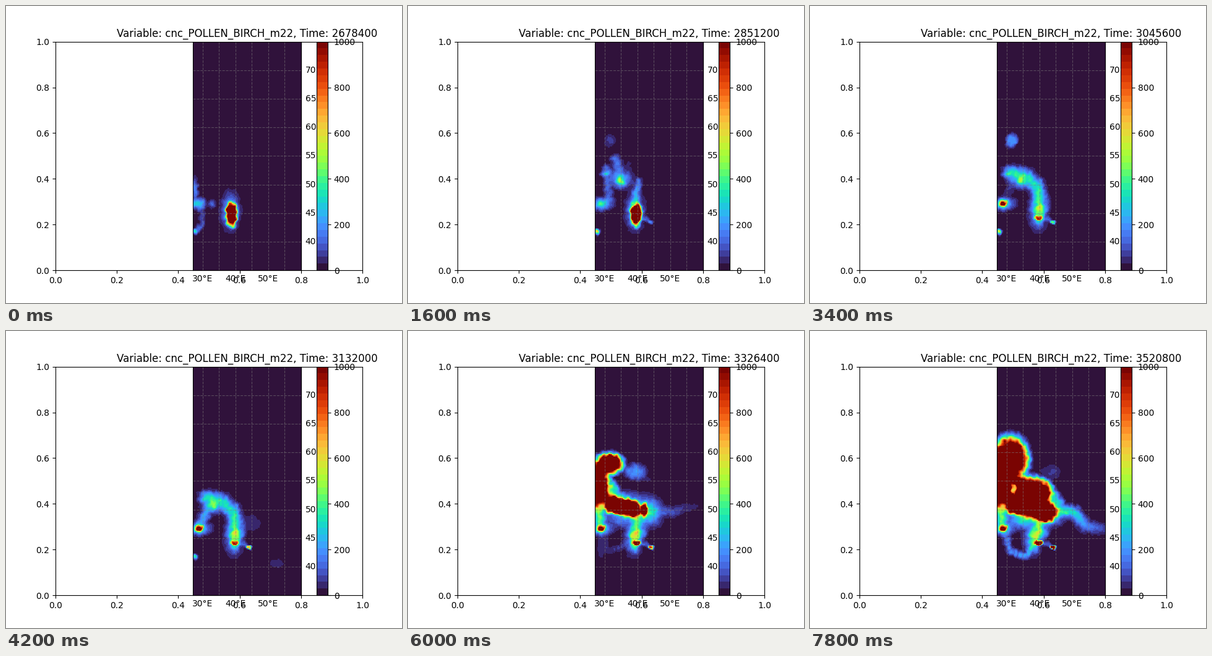
A matplotlib script for the animation above (8 s loop, 640 by 480 pixels).

```python
import numpy as np
import matplotlib.pyplot as plt
from matplotlib.animation import FuncAnimation

W, H = 640, 480
FRAMES, INTERVAL = 40, 200
STEPS_PER_DAY = 4
T_START, T_STEP = 2678400, 21600
LEFT, RIGHT, TOP, BOTTOM = 302.4, 476.8, 57.6, 427.2
CAP = 1500

# All places are in stage pixels, all times in days.
rng = np.random.default_rng(7)
NX, NY = 165, 200
gx, gy = np.meshgrid(LEFT + (np.arange(NX) + 0.5) * (RIGHT - LEFT) / NX,
                     TOP + (np.arange(NY) + 0.5) * (BOTTOM - TOP) / NY)


def ripple(scale, waves=8):
    """Smooth noise from a few random sine waves."""
    total = np.zeros_like(gx)
    for _ in range(waves):
        kx, ky = rng.normal(0, 0.4, 2)
        total += np.sin(kx * gx + ky * gy + rng.uniform(0, 2 * np.pi))
    return scale * total / np.sqrt(waves)


px, py = gx + ripple(1.1), gy + ripple(1.1)
grain = 1 + ripple(0.08)


def ramp(t, start, end):
    u = np.clip((t - start) / (end - start), 0, 1)
    return u * u * (3 - 2 * u)


def pulse(t, peak, span):
    return np.exp(-((t - peak) / span) ** 2)


def puff(x, y, rx, ry, amp, power=1):
    """Elliptic cloud; a higher power gives a flatter top and a crisper rim."""
    if amp < 5:
        return np.zeros_like(gx)
    q = ((px - x) / rx) ** 2 + ((py - y) / ry) ** 2
    return amp * np.exp(-q ** power)


def trail(points, r, amp, fade=1, power=1, n=12):
    """Chain of puffs along a path, fading towards its far end."""
    u = np.linspace(0, 1, n)
    knots = np.linspace(0, 1, len(points))
    path = np.array(points, float)
    places = zip(np.interp(u, knots, path[:, 0]), np.interp(u, knots, path[:, 1]))
    chain = [puff(x, y, r, r, amp * (1 + (fade - 1) * k), power)
             for k, (x, y) in zip(u, places)]
    return np.max(chain, axis=0)


def sites(t):
    """Fixed spots that flare up and die down."""
    sea_x = 365 + 6 * np.sin(np.pi * t / 8.5)
    early = 1 - ramp(t, 2, 3.25)
    sea = 350 + 1150 * early + 900 * pulse(t, 6.5, 0.7)
    yield puff(sea_x, 337, 9, 18, sea, 2)
    yield puff(sea_x - 2, 332, 13, 25, 250)
    yield puff(370, 343, 7, 3.5, 900 * ramp(t, 2.5, 3.2) + 600 * ramp(t, 7, 8), 2)
    yield trail([(368, 325), (368, 303), (374, 283)], 6, 320 * ramp(t, 0.5, 2), 0.5)

    port = 130 * ramp(t, 1, 2) + 520 * ramp(t, 3.5, 5) + 700 * ramp(t, 7, 8.5)
    yield puff(393, 350.5, 5, 3.5, port, 2)
    yield trail([(378, 343), (392, 350)], 4, 130 * ramp(t, 1, 2))

    yield puff(306, 365, 3.5, 4,
               (330 + 550 * pulse(t, 3, 1.6)) * (1 - ramp(t, 5.3, 6.3)))
    yield trail([(308, 363), (317, 354), (318, 335)], 5,
                150 * (1 - ramp(t, 0.5, 1.5)), 0.5)
    yield puff(333, 321, 6, 6, 125 * (1 - ramp(t, 0.5, 1.5)))

    settled = ramp(t, 2, 5)
    yield puff(305 + 7 * ramp(t, 0, 2), 319, 7 - settled, 6 - settled,
               300 + 1000 * settled)
    yield puff(314, 320, 8 + 7 * ramp(t, 0, 2), 9, 270)
    yield puff(306, 298, 5, 17, 170 * (1 - ramp(t, 0.3, 2)))
    yield puff(321, 271, 8, 5, 680 * pulse(t, 3.1, 1.1))

    woken = ramp(t, 0.8, 2)
    mid_x = 344 - 8 * ramp(t, 3.6, 5.2)
    yield puff(mid_x, 283, 7 + 4 * pulse(t, 3.25, 0.7), 8, 420 * woken)
    yield puff(mid_x, 280, 17, 14, 240 * woken)


def outbreak(t):
    """The mass bloom that fills the north-west and spreads east."""
    late = ramp(t, 5.7, 6.4)
    wide = ramp(t, 6.7, 8.4)
    tall = ramp(t, 8.6, 9.75)
    yield puff(326 - 2 * tall, 218 - 7 * wide - 4 * tall,
               10 + 6 * late + 9 * wide + 2 * tall,
               11 + 4 * late + 3 * wide + 16 * tall,
               CAP * (pulse(t, 3.25, 0.7) + late), 2)
    yield puff(303, 250, 19 + 6 * wide, 38, CAP * late, 2)

    front = [(308, 250), (308 + 30 * wide + 30 * tall, 250 + 17 * wide - 5 * tall)]
    yield trail(front, 17 + 5 * tall, CAP * wide, power=2)
    ridge = [(332, 281), (346 + 36 * wide, 284 + 8 * wide)]
    yield trail(ridge, 13 + 4 * wide, CAP * late, power=2)
    yield trail([(318, 278), (388, 292)], 18, 400 * late)
    for x in (365, 382):
        yield puff(x, 290, 6, 12, 1150 * late, 2)

    yield puff(310, 303, 9, 18, 450 * late)
    yield puff(345, 307, 22, 11, 330 * wide)
    yield trail([(372, 305), (368, 335)], 7, 330 * wide)


def haze(t):
    """Thin plumes carried off by the wind."""
    spread = pulse(t, 2, 0.9)
    yield trail([(321, 262), (325, 312)], 7, 130 * spread)
    yield trail([(336, 248), (344, 282)], 8, 150 * spread)
    yield trail([(325, 270), (350, 275), (368, 295), (373, 325)], 11,
                330 * ramp(t, 2, 3.1))
    yield trail([(324, 222), (308, 236)], 8, 260 * pulse(t, 3.25, 0.7), 0.5)
    yield trail([(314, 312), (330, 285)], 8, 220 * pulse(t, 5.2, 0.8))

    yield puff(358 + 22 * (t - 2), 255, 24, 16, 50 * pulse(t, 2.7, 0.9))
    yield puff(397, 310 + 20 * (t - 5.25), 18, 16, 75 * pulse(t, 5.8, 0.9))
    yield puff(438, 376 - 16 * (t - 5.25), 18, 10, 70 * pulse(t, 5.8, 0.8))
    yield puff(402, 315, 25, 9, 120 * pulse(t, 6.5, 0.8))

    island = pulse(t, 8.5, 0.7)
    x = 378 + 10 * (t - 8.5)
    yield puff(x, 228, 17, 13, 1400 * island, 1.5)
    yield trail([(345, 222), (x, 228)], 6, 550 * island)
    yield trail([(x, 230), (x + 34, 247)], 9, 420 * island, 0.25)

    far = ramp(t, 7, 8.4)
    sag = ramp(t, 8.6, 9.75)
    yield trail([(396, 290), (428, 294), (444, 287 + 28 * sag), (474, 283 + 38 * sag)],
                9, 440 * far, 0.2, n=16)
    yield trail([(380, 250), (402, 278)], 8, 280 * sag)
    yield trail([(318, 330), (323, 356), (350, 347 + 17 * sag), (366, 342 - 6 * sag)],
                6, 150 * far, 2)
    yield puff(313, 350, 10, 26, 140 * pulse(t, 8.5, 0.9))


def concentration(t):
    clouds = [*sites(t), *outbreak(t), *haze(t)]
    total = np.sqrt(sum(c * c for c in clouds)) * grain
    clearing = puff(329, 256, 7 - 2 * ramp(t, 8.6, 9.75), 12, 850 * ramp(t, 7, 8.4), 2)
    return np.clip(np.minimum(total, CAP) - clearing, 0, CAP)


fig = plt.figure(figsize=(W / 100, H / 100), dpi=100)
fig.add_subplot()
ax = fig.add_subplot()
image = ax.imshow(np.zeros_like(gx), cmap=plt.get_cmap("turbo", 34),
                  vmin=0, vmax=1000, interpolation="nearest",
                  extent=(LEFT, RIGHT, BOTTOM, TOP))
ax.set(xticks=[], yticks=[])
grid = dict(color="gray", alpha=0.5, linestyle="--", linewidth=0.8)
for lon in range(30, 60, 5):
    x = LEFT + (lon - 27.1) * 5.3
    ax.axvline(x, **grid)
    if lon % 10 == 0:
        ax.text(x, BOTTOM + 7, f"{lon}°E", ha="center", va="top")
for lat in range(40, 75, 5):
    y = BOTTOM - (lat - 35) * 9.24
    ax.axhline(y, **grid)
    ax.text(RIGHT + 7, y, f"{lat}°N", ha="left", va="center")
title = ax.set_title("")
fig.colorbar(image, ax=ax)


def draw(i):
    image.set_data(concentration(i / STEPS_PER_DAY))
    title.set_text(f"Variable: cnc_POLLEN_BIRCH_m22, Time: {T_START + T_STEP * i}")
    return image, title


anim = FuncAnimation(fig, draw, frames=FRAMES, interval=INTERVAL,
                     init_func=lambda: draw(0), repeat=True, repeat_delay=0)
plt.show()
```
